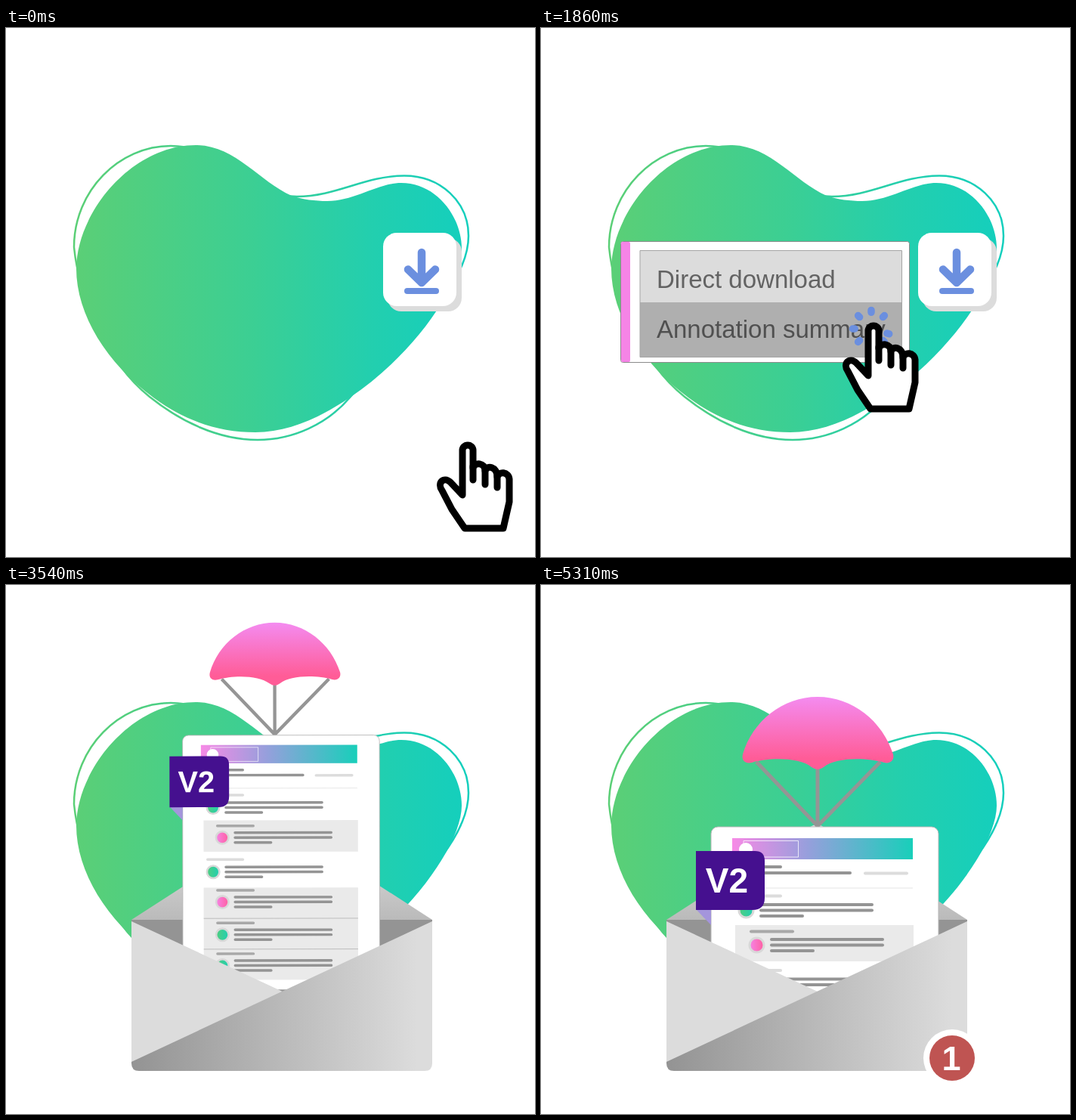
Animation, 700 px wide and 700 px high, one loop 5.34 s. Source, as an HTML page:

```html
<!DOCTYPE html>
<html lang="en">
<head>
<meta charset="utf-8">
<title>Download by mail</title>
<style>
html, body { margin: 0; width: 100%; height: 100%; overflow: hidden; background: #fff; }
svg { display: block; width: 100vw; height: 100vh; }
text { font-family: "Liberation Sans", Arial, sans-serif; }
.bold { font-weight: bold; fill: #fff; text-anchor: middle; }
</style>
</head>
<body>
<svg viewBox="0 0 700 700">
  <defs>
    <linearGradient id="blobFill" gradientUnits="userSpaceOnUse" x1="90" x2="610" y1="0" y2="0">
      <stop offset="0" stop-color="#5bcf76"/><stop offset=".45" stop-color="#3ccf93"/><stop offset=".75" stop-color="#23cfae"/><stop offset="1" stop-color="#14cfbd"/>
    </linearGradient>
    <linearGradient id="headFill"><stop offset="0" stop-color="#f78ae6"/><stop offset=".42" stop-color="#969fdc"/><stop offset="1" stop-color="#18cfba"/></linearGradient>
    <linearGradient id="green"><stop offset="0" stop-color="#52ce7f"/><stop offset="1" stop-color="#1fcfb2"/></linearGradient>
    <linearGradient id="pink"><stop offset="0" stop-color="#f584e6"/><stop offset="1" stop-color="#ff5fa0"/></linearGradient>
    <linearGradient id="canopy" x2="0" y2="1"><stop offset="0" stop-color="#f48bf0"/><stop offset=".85" stop-color="#ff5c97"/></linearGradient>
    <linearGradient id="flap" x2="0" y2="1"><stop offset=".2" stop-color="#dcdcdc"/><stop offset="1" stop-color="#bababa"/></linearGradient>
    <linearGradient id="front"><stop offset="0" stop-color="#939393"/><stop offset=".95" stop-color="#dcdcdc"/></linearGradient>
    <clipPath id="wipe"><rect id="wipeRect" y="270" width="500" height="190"/></clipPath>
    <clipPath id="pocket"><rect y="-100" width="700" height="700"/></clipPath>
  </defs>

  <path fill="none" stroke="url(#blobFill)" stroke-width="2.5" d="M90 290C90 215 150 156 218 156C290 156 330 223 385 223C437 223 475 195.500 527 195.500C575 195.500 612 230 612 275C612 350 510 425 455 489C425 524 380 545 333 545C280 545 230 520 190 488C130 440 96 350 90 290Z"/>
  <path fill="url(#blobFill)" d="M93 318C94 243 167 155 251 155C303 155 335 203 378 222C393 227 409 229 425 229C462 229 492 205 523 205C570 205 603 250 603 292C603 340 540 432 455 489C415 516 373 535 330 535C281 535 235 519 195 489C134 444 93 380 93 318Z"/>

  <g id="panel">
    <g id="menu" clip-path="url(#wipe)">
      <rect x="105.5" y="282.5" width="382" height="160" rx="3" fill="#fff" stroke="#8a8a8a"/>
      <rect x="106" y="283" width="12" height="159" rx="2" fill="#f584e6"/>
      <path fill="#dcdcdc" d="M131 294h346v69h-346z"/>
      <path id="choice" d="M131 363h346v73h-346z"/>
      <path fill="none" stroke="#a5a5a5" d="M131 294.5h346.500v141h-346.500z"/>
      <g font-size="33"><text x="153" y="343.500" fill="#636363">Direct download</text><text x="153" y="409.500" fill="#505050">Annotation summary</text></g>
    </g>
    <g id="button">
      <rect x="505" y="278" width="98" height="97" rx="18" fill="#dcdcdc"/>
      <rect x="499" y="271" width="97" height="97" rx="18" fill="#fff"/>
      <rect id="press" x="499" y="277" width="104" height="98" rx="18" fill="#dcdcdc"/>
      <g fill="none" stroke="#6b8fdf" stroke-linecap="round" stroke-linejoin="round">
        <path stroke-width="10.500" d="M550 297v40M532 319.500l18 17.500l18-17.500"/><path stroke-width="8" d="M531 348h38"/>
      </g>
    </g>
  </g>
  <path id="rays" fill="none" stroke="#6b8fdf" stroke-width="9.500" stroke-linecap="round"/>
  <g id="hand" stroke="#000" stroke-width="9" stroke-linejoin="round" stroke-linecap="round">
    <path fill="#fff" d="M604 618L588 601C579 593 570 602 577 612L590 637L607 662H658L666 627V597C665 587 652 586 650 594C650 580 636 578 634 586C634 575 620 574 618 582V559a7 7 0 0 0-14 0Z"/>
    <path fill="none" d="M618 580V598M634 584V604M650 592V608"/>
  </g>

  <g id="back">
    <path fill="url(#flap)" d="M166 443L358 319Q365 315 372 319L564 443Z"/>
    <path fill="#949494" d="M166 443H564V460L365 545L166 460Z"/>
  </g>
  <g clip-path="url(#pocket)"><g id="letter">
    <path stroke="#959595" stroke-width="5" fill="none" d="M285 234L366 319L449 234M366 240V319"/>
    <path fill="url(#canopy)" d="M267 224C280 180 320 148 366 148C412 148 452 180 466 224C468 232 462 237 454 235C430 228 390 228 374 241Q366 247 358 241C342 228 302 228 279 235C270 237 265 232 267 224Z"/>
    <rect x="225" y="320" width="301" height="389" rx="9" fill="#fff" stroke="#b5b5b5"/>
    <path fill="url(#headFill)" d="M253 335h239v28h-239z"/>
    <path fill="none" stroke="#fff" stroke-opacity=".75" d="M268 338.500h72.500v21.500h-72.500z"/>
    <circle cx="271" cy="350" r="9" fill="#fff"/>
    <g id="rows" fill="none" stroke-width="4" stroke-linecap="round"></g>
    <path fill="#a495dc" d="M205 429h20v21z"/>
    <path fill="#45108f" d="M205 352h78q13 0 13 13v49q0 16-16 16h-75z"/>
    <text class="bold" x="246" y="407" font-size="46">V2</text>
  </g></g>
  <g id="envelope">
    <path fill="#dcdcdc" d="M166 445L366 538L166 633Z"/>
    <path fill="url(#front)" d="M564 445V633q0 10-10 10H176q-10 0-10-10V631Z"/>
  </g>
  <g id="badge">
    <circle r="38" fill="#fff"/><circle r="30" fill="#bf5452"/>
    <text class="bold" x="-1" y="16" font-size="45">1</text>
  </g>
</svg>
<script>
const LOOP = 5340;
const $ = id => document.getElementById(id);
const set = (id, name, value) => $(id).setAttribute(name, value);
const ramp = (t, a, b) => Math.min(1, Math.max(0, (t - a) / (b - a)));
const smooth = u => u * u * (3 - 2 * u);
const mix = (a, b, u) => a + (b - a) * u;

// Cubic track through [time, value, slope] keys
function track(t, keys) {
  if (t <= keys[0][0]) return keys[0][1];
  for (let i = 1; i < keys.length; i++) {
    const [t0, a, m = 0] = keys[i - 1], [t1, b, n = 0] = keys[i];
    if (t > t1) continue;
    const d = t1 - t0, u = (t - t0) / d, v = 1 - u;
    return v * v * ((1 + 2 * u) * a + u * d * m) + u * u * ((1 + 2 * v) * b - v * d * n);
  }
  return keys[keys.length - 1][1];
}

function buildRows() {
  const line = (x1, x2, y, color = '#949494', w = 4) =>
    `<path d="M${x1 + w / 2} ${y}H${x2 - w / 2}" stroke="${color}" stroke-width="${w}"/>`;
  const box = (y, h) => `<path fill="#eaeaea" d="M257 ${y}h236v${h}h-236z"/>`;
  let s = line(289, 319, 373) + line(289, 411, 381) + line(427, 486, 381.5, '#dcdcdc') +
    line(253, 492, 401, '#e4e4e4', 1) + box(450, 48) + box(553, 141) +
    line(257, 493, 600, '#b5b5b5', 1) + line(257, 493, 647, '#b5b5b5', 1);
  const rows = [[430.5, 0, 'green'], [476.5, 1, 'pink'], [529, 0, 'green'], [575, 1, 'pink'], [625, 1, 'green'], [672, 1, 'green']];
  for (const [y, reply, color] of rows) {
    const x = reply ? 303 : 289;
    s += reply ? line(276, 335, y - 18, '#a8a8a8') : line(261, 319, y - 19, '#dcdcdc');
    s += line(x, x + 151, y - 7.5) + line(x, x + 151, y) + line(x, x + 59, y + 7.5);
    s += `<circle cx="${x - 17.5}" cy="${y}" r="9.5" fill="url(#${color})" stroke="#d8d8d8" stroke-width="3"/>`;
  }
  $('rows').innerHTML = s;
}

function drawRays(t) {
  const second = t > 1500;
  const u = (t - (second ? 1794 : 582)) / 300;
  const [cx, cy] = second ? [437, 398] : [549, 326];
  let d = '';
  if (u > 0 && u < 1) for (let i = 0; i < 8; i++) {
    const a = i * Math.PI / 4 + (i === 0 ? .28 : 0), r = 12 + 50 * u, h = 6.5 * u;
    const at = q => (cx + q * Math.cos(a)).toFixed(1) + ' ' + (cy + q * Math.sin(a)).toFixed(1);
    d += `M${at(r - h)}L${at(r + h)}`;
  }
  set('rays', 'd', d);
}

function draw(t) {
  const open = ramp(t, 690, 1040);
  set('wipeRect', 'x', 488 - 383 * open);
  set('menu', 'opacity', open);
  set('choice', 'fill', t < 1650 ? '#dcdcdc' : '#afafaf');
  set('press', 'opacity', t > 580 && t < 930 ? 1 : 0);

  const leave = Math.max(0, t - 2200) / 290, fade = 1 - ramp(t, 2340, 2640);
  set('panel', 'transform', `translate(${-288 * leave * leave})`);
  set('button', 'opacity', fade);
  set('hand', 'opacity', fade);
  const reach = smooth(ramp(t, 30, 560)), pick = smooth(ramp(t, 1180, 1680));
  const hx = mix(-62 * reach, -171, pick), hy = mix(-239 * reach, -158, pick) + 37 * leave * leave;
  set('hand', 'transform', `translate(${hx} ${hy})`);
  drawRays(t);

  const rise = 390 * (1 - ramp(t, 2570, 3060)) ** 3;
  set('back', 'transform', `translate(0 ${rise})`);
  set('envelope', 'transform', `translate(0 ${rise})`);

  const x = track(t, [[2700, 370], [3180, 319], [3900, 392], [4350, 366]]);
  const y = track(t, [[2700, -200, .6], [3180, 69.5, .45], [3900, 277, .17], [4350, 320]]);
  const tilt = track(t, [[2700, 2], [3180, -3.6], [3900, 3.4], [4350, 0]]);
  const size = track(t, [[2700, .45, .0004], [3180, .64, .0005], [3900, 1]]);
  set('letter', 'transform', `translate(${x} ${y}) rotate(${tilt}) scale(${size}) translate(-366 -320)`);
  set('letter', 'visibility', t < 2700 ? 'hidden' : 'visible');

  const pop = track(t, [[4120, 0], [4300, 1, .001], [4430, 1.18], [4600, 1]]);
  set('badge', 'transform', `translate(544 626) scale(${pop})`);
}

buildRows();
const start = performance.now();
function tick() {
  draw((performance.now() - start) % LOOP);
  requestAnimationFrame(tick);
}
tick();
</script>
</body>
</html>
```
